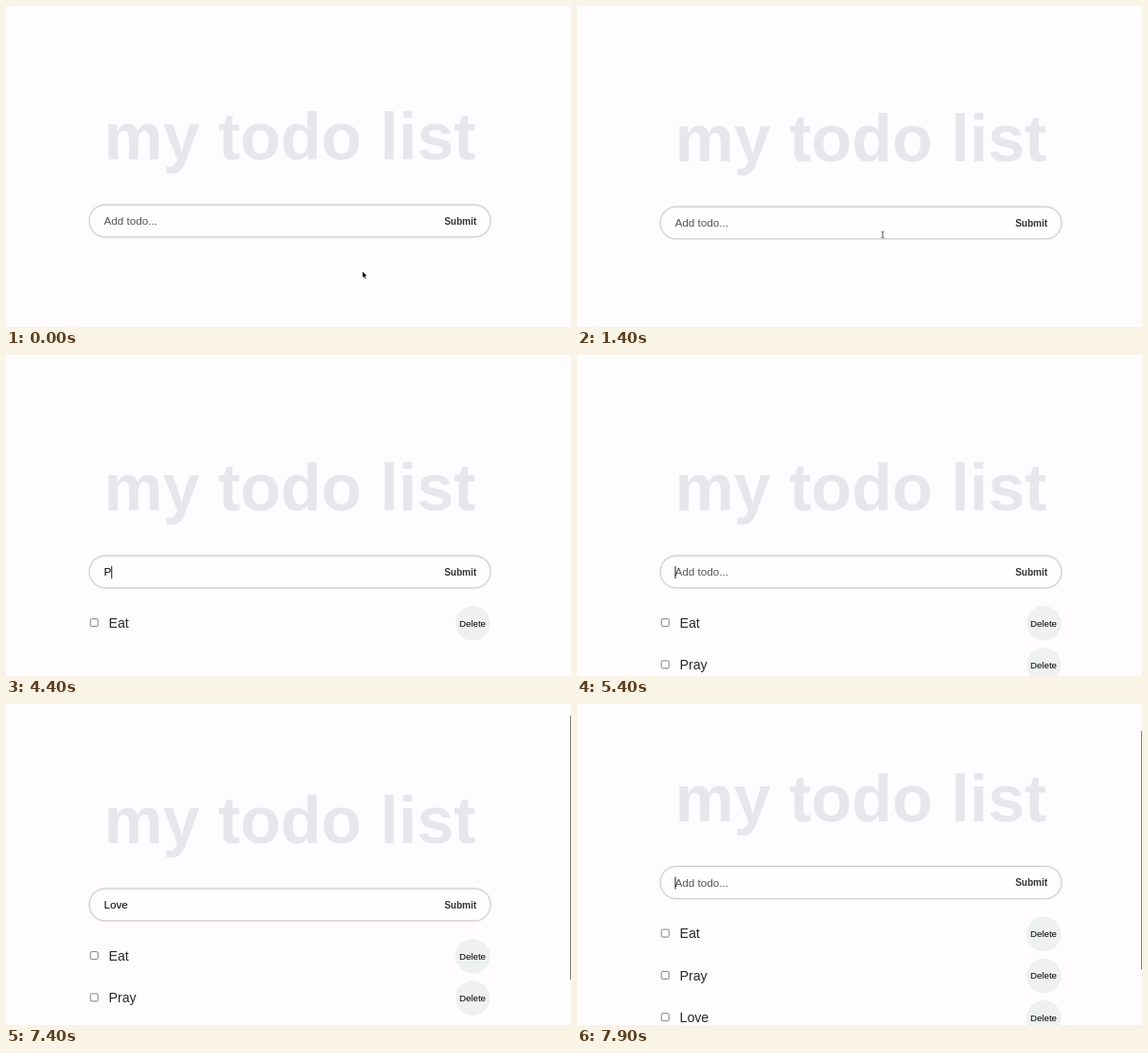
Write an HTML page that moves like this. It is 597 px wide and 339 px high and loops after 8000 ms.

```html
<!DOCTYPE html>
<html lang="en">
<head>
<meta charset="utf-8">
<title>Todo list</title>
<style>
  html, body { margin: 0; width: 100%; height: 100%; overflow: hidden; background: #fefcff; }
  svg { display: block; width: 597px; height: 339px; font-family: "Liberation Sans", Arial, sans-serif; }
  .title { font: bold 70px "Liberation Sans", Arial, sans-serif; fill: #e8e6ea; text-anchor: middle; }
  .field { fill: #fefdff; filter: drop-shadow(0 .7px 1.3px rgba(0, 0, 0, .55)); }
  .entry { font-size: 11.7px; }
  #hint { fill: #555; }
  .submit { font-size: 10px; font-weight: bold; fill: #333; }
  .task { font-size: 14.2px; fill: #28282a; }
  .check { fill: #fff; stroke: #707070; stroke-width: .9; }
  .round { fill: #eef0f1; }
  .delete { font-size: 9.7px; text-anchor: middle; }
  #thumb { fill: #7d7d7f; }
  #arrow { fill: #000; stroke: #fff; stroke-width: .6; paint-order: stroke; }
  #beam { fill: none; stroke: #333; stroke-width: .8; }
</style>
</head>
<body>
<svg viewBox="0 0 597 339">
  <g id="page">
    <text class="title" x="300" y="164">my todo list</text>
    <rect class="field" x="88.5" y="212.5" width="423" height="33" rx="16.5"/>
    <text class="entry" id="hint" x="103.5" y="233">Add todo...</text>
    <text class="entry" id="typed" x="103.5" y="233"></text>
    <rect id="caret" y="223" width=".9" height="13"/>
    <text class="submit" x="463.2" y="232.6">Submit</text>
    <g id="list"></g>
  </g>
  <rect id="thumb" x="596" width="1" rx=".5"/>
  <path id="arrow" d="M0 0V6.2L1.4 4.9L2.4 7.2L3.4 6.8L2.4 4.6H4.3Z"/>
  <path id="beam" d="M-1.5 -3.2Q0 -3.2 0 -2.2V2.2Q0 3.2 -1.5 3.2M1.5 -3.2Q0 -3.2 0 -2.2M0 2.2Q0 3.2 1.5 3.2"/>
</svg>
<script>
  const LOOP = 8000, STEP = 100, BLINK = 500, ROW = 44.3, CLICK = 900;
  const tasks = [
    { name: "Eat", keys: [1700, 2300, 2600], submit: 3100 },
    { name: "Pray", keys: [4400, 4700, 4800, 5000], submit: 5400 },
    { name: "Love", keys: [6100, 6300, 6500, 6600], submit: 7900 }
  ];
  // [time, page offset]
  const offsets = [[0, -2], [100, -1], [200, 0], [7400, -17], [7500, -31], [7600, -40.5]];
  const resets = [CLICK, ...tasks.flatMap(task => task.keys)];

  const el = id => document.getElementById(id);
  const [page, hint, typed, caret, list, thumb, arrow, beam] =
    ["page", "hint", "typed", "caret", "list", "thumb", "arrow", "beam"].map(el);
  const show = (node, on) => node.setAttribute("visibility", on ? "visible" : "hidden");
  const move = (node, x, y) => node.setAttribute("transform", `translate(${x} ${y})`);

  list.innerHTML = tasks.map((task, i) => `
    <g transform="translate(0 ${i * ROW})">
      <rect class="check" x="89.2" y="278.6" width="8" height="8" rx="1.5"/>
      <text class="task" x="108.5" y="287.8">${task.name}</text>
      <circle class="round" cx="493.2" cy="283.3" r="18.3"/>
      <text class="delete" x="493" y="286.7">Delete</text>
    </g>`).join("");
  const rows = [...list.children];

  function drawEntry(t) {
    const task = tasks.find(item => t < item.submit);
    const text = task ? task.name.slice(0, task.keys.filter(k => k <= t).length) : "";
    if (typed.textContent !== text) typed.textContent = text;
    show(hint, !text);
    const reset = resets.filter(k => k <= t).pop();
    show(caret, t >= CLICK && Math.floor((t - reset) / BLINK) % 2 === 0);
    caret.setAttribute("x", 103.5 + (text ? typed.getComputedTextLength() : 0));
  }

  function drawPointer(t) {
    const p = Math.min(t / 800, 1), ease = p * p * (3 - 2 * p);
    const x = 376.8 - 53.8 * ease, y = 280.5 - 39 * ease;
    const inField = y < 246;
    move(arrow, x, y);
    move(beam, x, y);
    show(arrow, t < 1600 && !inField);
    show(beam, t < 1600 && inField);
  }

  function draw(now) {
    const t = Math.floor(now % LOOP / STEP) * STEP;
    const offset = offsets.filter(o => o[0] <= t).pop()[1];
    move(page, 0, offset);
    rows.forEach((row, i) => show(row, t >= tasks[i].submit));
    drawEntry(t);
    drawPointer(t);
    show(thumb, t >= 7400);
    thumb.setAttribute("y", -offset * .7);
    thumb.setAttribute("height", t < 7900 ? 279 : 252);
  }

  let start;
  function tick(now) {
    start ??= now;
    draw(now - start);
    requestAnimationFrame(tick);
  }
  draw(0);
  requestAnimationFrame(tick);
</script>
</body>
</html>
```
